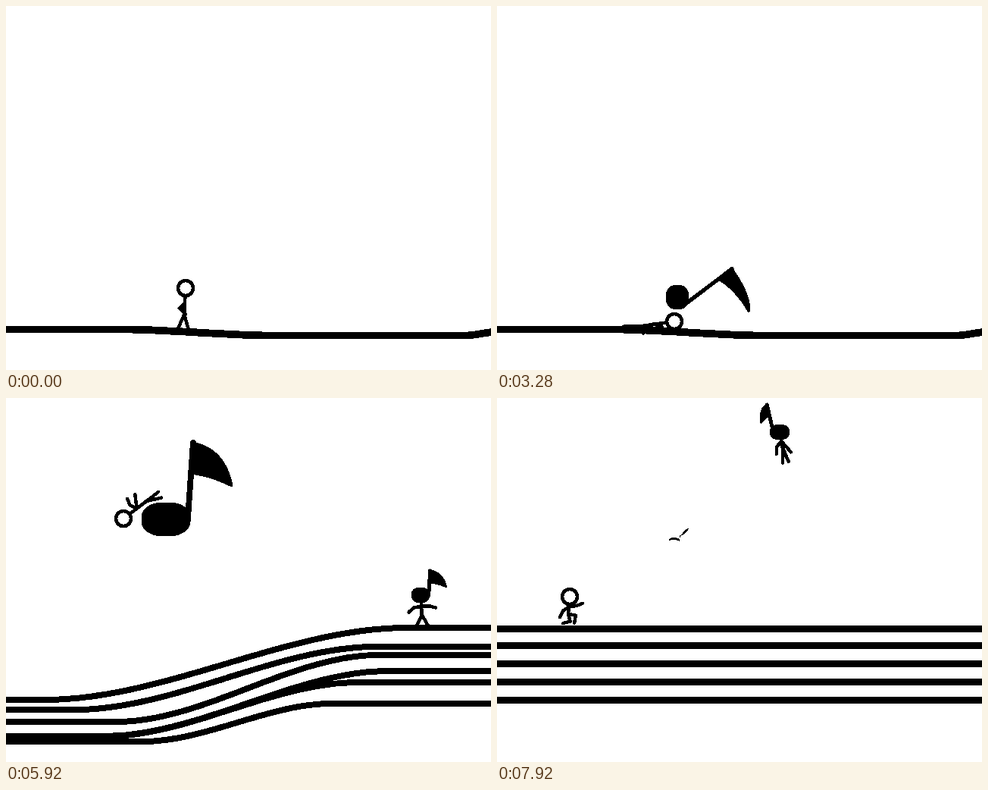
These frames come from a looping animation (640 by 480 pixels, 8000 ms). An HTML page with a canvas:

```html
<!DOCTYPE html>
<html lang="en">
<head>
<meta charset="utf-8">
<title>Stick figure and notes</title>
<style>
html, body { margin: 0; width: 100%; height: 100%; overflow: hidden; background: #fff; }
canvas { display: block; width: 640px; height: 480px; }
</style>
</head>
<body>
<canvas id="stage" width="640" height="480"></canvas>
<script>
const ctx = document.getElementById('stage').getContext('2d', { willReadFrequently: true });
const LOOP = 8000, TICK = 80;
const ARM = 19, LEG = 20, HEAD = 10.5, LINE = 4.5;

const mix = (a, b, k) => a + (b - a) * k;
const ramp = (a, b, v) => Math.max(0, Math.min(1, (v - a) / (b - a)));
const smooth = (a, b, v) => { const k = ramp(a, b, v); return k * k * (3 - 2 * k); };

// Figure: head x, y, lean, body length, then angle and bend for two arms and two legs.
// Angles are in degrees, 0 hangs down and 90 points right.
const person = {
  stride: [237, 372, -3, 35, 0, 50, 5, 40, -24, 0, 16, 0],
  stand: [264, 373, -5, 33, 5, 50, 5, 45, -18, 0, 15, 0],
  balance: [296, 341, 3, 21, -59, 8, 92, -5, -31, 19, 25, -19],
  run: [305, 352, -23, 30, -106, 8, 75, 0, -73, 4, 36, -9],
  flip: [155, 159, 127, 38, -135, -20, 187, 0, 128, 0, 103, 0],
  lie: [118, 290, -82, 48, 60, -20, -50, 20, -90, 0, -88, 0],
  crouch: [96, 262, -5, 23, -41, 14, 104, 7, -30, -45, 35, -45]
};

// Note: head half width and height, stem angle and length, flag reach and drop, side.
const glyph = {
  air: [11, 9, 34, 34, 12, 21, 1],
  upright: [12, 10, 3, 33, 22, 20, 1],
  squat: [10, 8, -17, 23, 17, 14, 1],
  leap: [13, 10, -13, 39, 13, 21, -0.7]
};
const imp = {
  air: [589, 312, -3, 23, -107, 22, 42, 0, -58, 52, 15, 0, ...glyph.air],
  stand: [545, 318, 4, 26, -66, 17, 86, -10, -25, 0, 30, 0, ...glyph.upright],
  squat: [546, 271, 13, 22, -110, 0, 129, 25, -65, 50, 65, -50, ...glyph.squat],
  leap: [373, 45, 11, 21, -21, 19, 41, 0, 0, 0, 23, 0, ...glyph.leap]
};
const note = {
  fly: [563, 303, 16, 20, 83, 100, 50, 20, 1],
  rest: [228, 412, 15, 16, 53, 80, 58, 16, 1],
  sunk: [231, 412, 12, 20, 79, 93, 58, 22, 1],
  toss: [211, 160, 32, 22, 4, 103, 55, 53, 1]
};

// Keys: time, pose, shift x, shift y, height of the arc that leads here.
const personKeys = [
  [2240, person.stand], [3040, person.stand], [3280, person.lie, 116, 126], [3440, person.lie, 116, 126],
  [3680, person.stand, -40, -5], [3920, person.balance, 0, 0, 18], [4960, person.balance],
  [5440, person.run], [5680, person.run, -4, 10], [5920, person.flip], [6720, person.flip, -142, 75, 110],
  [6880, person.lie, -12], [6960, person.lie], [7120, person.lie], [7600, person.crouch]
];
const impKeys = [
  [4080, imp.air, 75, -4], [4480, imp.air, 0, 0, 10], [4880, imp.stand, 0, 70], [5440, imp.stand],
  [5760, imp.stand, 2, -56], [5920, imp.stand, 2, -58], [6640, imp.stand, -3, -62],
  [6800, imp.squat], [7200, imp.squat], [7920, imp.leap, 0, 0, 72]
];
const noteKeys = [
  [2320, note.fly, 80], [2480, note.fly], [3120, note.fly, -330, 82], [3280, note.rest, 10, -28],
  [3440, note.rest], [4960, note.rest], [5440, note.sunk], [5680, note.sunk, 0, 8],
  [5920, note.toss], [6160, note.toss, -10, -190]
];

function poseAt(keys, t) {
  let i = 0;
  while (i < keys.length - 2 && t >= keys[i + 1][0]) i++;
  const [t0, from, fx = 0, fy = 0] = keys[i];
  const [t1, to, tx = 0, ty = 0, arc = 0] = keys[i + 1];
  const k = ramp(t0, t1, t);
  const pose = from.map((v, j) => mix(v, to[j], k));
  pose[0] += mix(fx, tx, k);
  pose[1] += mix(fy, ty, k) - 4 * k * (1 - k) * arc;
  return pose;
}

// Two short steps alternate while the figure drifts right.
function walkerAt(t) {
  const step = Math.floor((t + 80) / 160), odd = step % 2;
  const pose = [...(odd ? person.stand : person.stride)];
  pose[0] = 237 + step * 27 / 14;
  return pose;
}

function stroke(points, width) {
  ctx.lineWidth = width;
  ctx.beginPath();
  points.forEach(p => ctx.lineTo(...p));
  ctx.stroke();
}

function along([x, y], degrees, length) {
  const a = degrees * Math.PI / 180;
  return [x + Math.sin(a) * length, y + Math.cos(a) * length];
}

function limb(start, angle, bend, length) {
  const joint = along(start, angle - bend, length / 2);
  const end = along(joint, angle + bend, length / 2);
  ctx.lineWidth = LINE;
  ctx.beginPath();
  ctx.moveTo(...start);
  ctx.quadraticCurveTo(...along(start, angle - bend, length * 0.35), ...joint);
  ctx.lineTo(...end);
  ctx.stroke();
}

function drawBody([x, y, lean, body, ...limbs]) {
  const head = [x, y], shoulder = along(head, lean, body * 0.58), hip = along(head, lean, body);
  stroke([along(head, lean, HEAD), hip], LINE);
  for (let i = 0; i < 8; i += 2) {
    const arm = i < 4;
    limb(arm ? shoulder : hip, limbs[i], limbs[i + 1], arm ? ARM : LEG);
  }
}

function drawPerson(pose) {
  drawBody(pose);
  ctx.beginPath();
  ctx.arc(pose[0], pose[1], HEAD - 0.5, 0, Math.PI * 2);
  ctx.stroke();
}

function drawNote([x, y, rx, ry, angle, stem, reach, drop, side]) {
  ctx.save();
  ctx.translate(x, y);
  ctx.beginPath();
  ctx.roundRect(-rx, -ry, 2 * rx, 2 * ry, { x: rx * 0.8, y: ry * 0.8 });
  ctx.fill();
  ctx.rotate(angle * Math.PI / 180);
  ctx.translate(rx * 0.9 * side, 0);
  stroke([[0, 0], [0, -stem]], 3 + rx * 0.15);
  ctx.translate(0, -stem);
  ctx.scale(Math.sign(side), 1);
  ctx.lineWidth = 3;
  ctx.beginPath();
  ctx.moveTo(0, 0);
  ctx.quadraticCurveTo(reach * 0.77, drop * 0.1, reach, drop);
  ctx.quadraticCurveTo(reach * 0.4, drop * 0.75, 0, reach * 0.25 + drop * 0.5);
  ctx.closePath();
  ctx.fill();
  ctx.stroke();
  ctx.restore();
}

function drawImp(pose) {
  drawBody(pose.slice(0, 12));
  drawNote([pose[0], pose[1], ...pose.slice(12)]);
}

function drawBird(t) {
  const k = ramp(7680, 7920, t);
  ctx.save();
  ctx.translate(mix(350, 240, k), mix(72, 182, k));
  ctx.rotate(-0.45);
  ctx.beginPath();
  ctx.moveTo(-16, 0);
  ctx.quadraticCurveTo(-8, -6, -1, 4);
  ctx.quadraticCurveTo(7, -4, 17, -4);
  ctx.quadraticCurveTo(9, 3, 1, 0);
  ctx.lineTo(-2, 7);
  ctx.quadraticCurveTo(-8, -1, -16, 0);
  ctx.fill();
  ctx.restore();
}

// Staff lines while sloping: left and right height, where the rise starts and ends, final height.
const staff = [
  [398, 303, 50, 530, 304.5], [411, 328, 90, 490, 326.5], [427, 339, 145, 492, 350.5],
  [446, 360, 130, 505, 350.5], [446, 375, 130, 465, 374.5], [453, 403, 180, 430, 398.5]
];
const flatGround = x => 426.5 + 8 * smooth(150, 355, x) - 5 * smooth(605, 650, x);

function hill(x, i) {
  const lift = 103 - 20 * Math.min(i, 3);
  return 427 + 40 * smooth(225, 330, x) - lift * (smooth(345, 545, x) - 0.95 * smooth(565, 720, x));
}

function drawGround(t) {
  const rise = ramp(4880, 5440, t), spread = ramp(5440, 5920, t), settle = ramp(5920, 6640, t);
  staff.forEach(([left, right, start, end, level], i) => {
    const points = [];
    for (let x = -10; x <= 650; x += 5) {
      const bumpy = mix(flatGround(x), hill(x, i), rise);
      const slope = mix(left, right, smooth(start, end, x));
      points.push([x, mix(mix(bumpy, slope, spread), level, settle)]);
    }
    stroke(points, rise === 0 || settle === 1 ? 9 : 8);
  });
}

// The drawing has hard, unsmoothed edges.
function harden() {
  const image = ctx.getImageData(0, 0, 640, 480), d = image.data;
  for (let i = 0; i < d.length; i += 4) d[i] = d[i + 1] = d[i + 2] = d[i] < 128 ? 0 : 255;
  ctx.putImageData(image, 0, 0);
}

function draw(t) {
  ctx.fillStyle = '#fff';
  ctx.fillRect(0, 0, 640, 480);
  ctx.fillStyle = ctx.strokeStyle = '#000';
  ctx.lineCap = ctx.lineJoin = 'round';
  drawGround(t);
  drawPerson(t < 2240 ? walkerAt(t) : poseAt(personKeys, t));
  if (t >= 2320 && t < 6160) drawNote(poseAt(noteKeys, t));
  if (t >= 4080) drawImp(poseAt(impKeys, t));
  if (t >= 7680) drawBird(t);
  harden();
}

let shown = -1;
function tick() {
  const t = Math.floor(performance.now() % LOOP / TICK) * TICK;
  if (t !== shown) draw(shown = t);
  requestAnimationFrame(tick);
}
tick();
</script>
</body>
</html>
```
